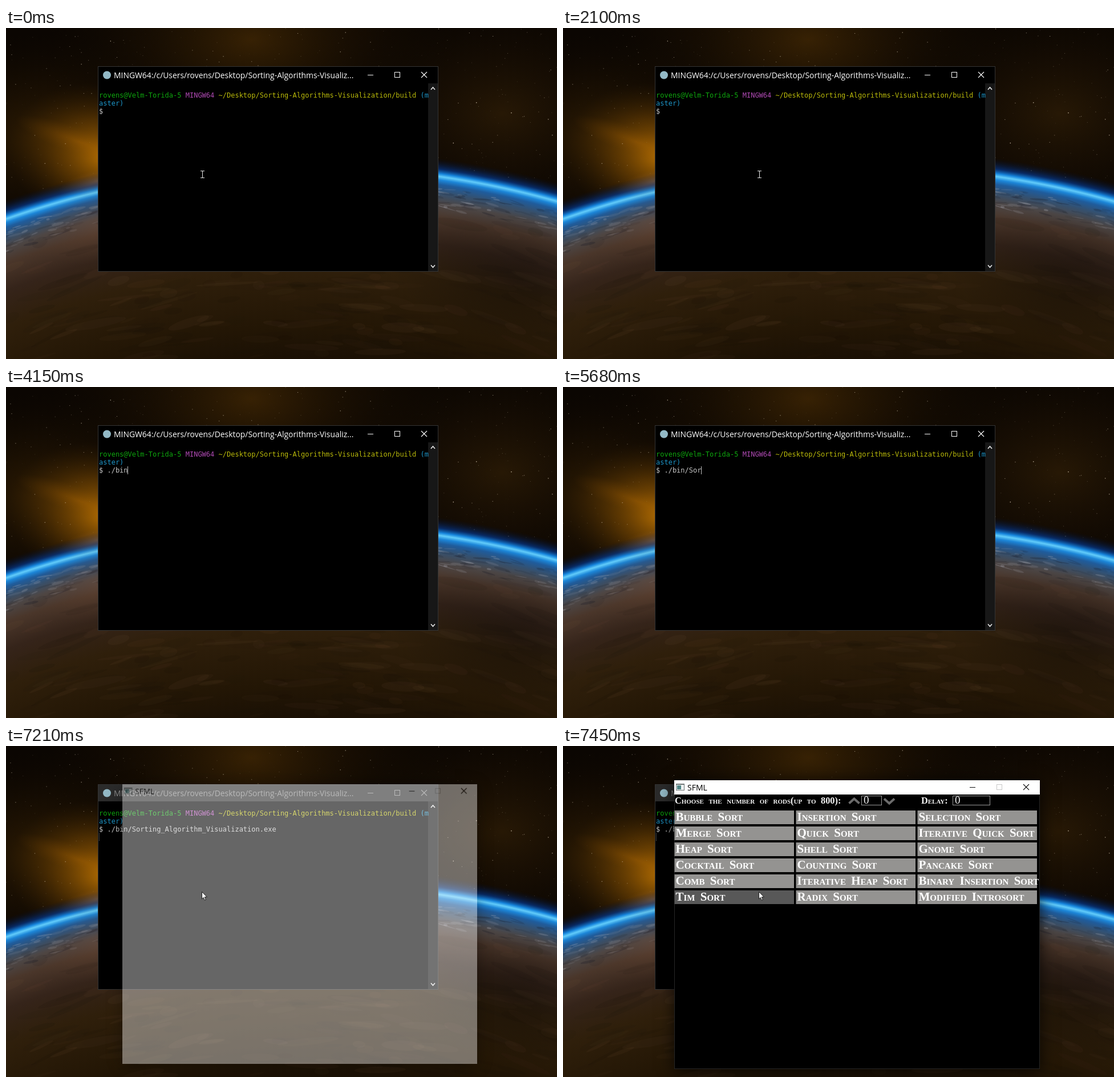
Write an HTML page with a canvas that moves like this. It is 966 by 580 pixels and loops after 8000 ms.

```html
<!DOCTYPE html>
<html lang="en">
<head>
<meta charset="utf-8">
<title>Terminal launching a sorting visualizer</title>
<style>
html, body { margin: 0; width: 100%; height: 100%; overflow: hidden; background: #000; }
canvas { display: block; }
</style>
</head>
<body>
<canvas id="stage" width="966" height="580"></canvas>
<script>
const W = 966, H = 580, LOOP = 8000;
const UI = '"Open Sans", sans-serif';
const MONO = '12px "DejaVu Sans Mono", monospace';
const SERIF = '"Liberation Serif", serif';
const ctx = document.getElementById('stage').getContext('2d');

function layer(w, h) {
  const c = document.createElement('canvas');
  c.width = w;
  c.height = h;
  return c.getContext('2d');
}

function rect(g, color, x, y, w, h) {
  g.fillStyle = color;
  g.fillRect(x, y, w, h);
}

function text(g, str, x, y, color, font, gap = 0) {
  g.font = font;
  g.wordSpacing = gap + 'px';
  g.fillStyle = color;
  g.fillText(str, x, y);
}

function line(g, color, width, ...pts) {
  g.strokeStyle = color;
  g.lineWidth = width;
  g.beginPath();
  for (let i = 0; i < pts.length; i += 2) g.lineTo(pts[i], pts[i + 1]);
  g.stroke();
}

// Negative h points the chevron down.
function chevron(g, color, width, x, y, w, h) {
  line(g, color, width, x - w, y + h, x, y - h, x + w, y + h);
}

function controls(g, color, boxColor, xs, y) {
  const [min, max, close] = xs;
  rect(g, color, min - 5, y, 10, 1);
  g.strokeStyle = boxColor;
  g.lineWidth = 1;
  g.strokeRect(max - 4.5, y - 4.5, 9, 9);
  line(g, color, 1.1, close - 5, y - 5, close + 5, y + 5);
  line(g, color, 1.1, close - 5, y + 5, close + 5, y - 5);
}

// ---- desktop picture ----
function desktop() {
  const g = layer(W, H);
  let seed = 11;
  const rnd = () => (seed = seed * 16807 % 2147483647) / 2147483647;

  function glow(x, y, r, squash, tilt, ...stops) {
    g.save();
    g.translate(x, y);
    g.rotate(tilt);
    g.scale(1, squash);
    const grad = g.createRadialGradient(0, 0, 0, 0, 0, r);
    stops.forEach((c, i) => grad.addColorStop(i / (stops.length - 1), c));
    rect(g, grad, -r, -r, 2 * r, 2 * r);
    g.restore();
  }

  rect(g, '#0b0602', 0, 0, W, H);
  glow(430, 20, 360, .6, 0, 'rgba(66,40,4,.8)', 'rgba(40,24,3,.4)', 'rgba(20,12,2,0)');
  glow(870, 150, 280, .7, 0, 'rgba(46,29,6,.8)', 'rgba(30,18,4,.5)', 'rgba(20,12,2,0)');
  glow(60, 190, 260, .7, 0, 'rgba(62,38,4,.7)', 'rgba(40,24,3,.4)', 'rgba(20,12,2,0)');
  glow(172, 225, 170, .75, .2, 'rgba(200,122,2,.9)', 'rgba(130,78,2,.5)', 'rgba(60,36,2,0)');
  glow(130, 200, 120, .2, .35, 'rgba(170,100,2,.35)', 'rgba(120,70,2,0)');

  for (let i = 0; i < 520; i++) {
    const x = rnd() * W, y = rnd() * 300, s = .5 + rnd() * .9;
    rect(g, `rgba(230,215,190,${.12 + .75 * rnd() ** 3})`, x, y, s, s);
  }

  // planet: one big disc shaded by distance from its centre
  const cx = 532, cy = 1852, inner = 1250, outer = 1640;
  const shade = g.createRadialGradient(cx, cy, inner, cx, cy, outer);
  [[1250, '#170e04'], [1330, '#231605'], [1430, '#2f1f0b'], [1490, '#35241a'],
   [1535, '#4a362a'], [1562, '#4c4747'], [1580, '#35506e'], [1594, '#1f5c9c'],
   [1602, '#1c86d8'], [1608, '#62ccfa'], [1613, '#1584dc'], [1621, 'rgba(5,52,130,.75)'],
   [1640, 'rgba(2,12,40,0)']]
    .forEach(([r, c]) => shade.addColorStop((r - inner) / (outer - inner), c));
  g.fillStyle = shade;
  g.beginPath();
  g.arc(cx, cy, outer, 0, 7);
  g.fill();

  function cloud(r, a, len, thick, color) {
    g.fillStyle = color;
    g.beginPath();
    g.ellipse(cx + r * Math.sin(a), cy - r * Math.cos(a), len, thick, a + rnd() * .3 - .15, 0, 7);
    g.fill();
  }
  const angle = () => (rnd() - .5) * .76;
  for (let i = 0; i < 420; i++) {
    const color = rnd() < .5 ? '190,190,200' : '22,24,34';
    cloud(1552 + rnd() * 38, angle(), 3 + rnd() * 14, .5 + rnd() * 2, `rgba(${color},${.06 + rnd() * .2})`);
  }
  for (let i = 0; i < 300; i++) {
    const color = rnd() < .5 ? '130,95,65' : '12,7,3';
    cloud(1270 + rnd() * 285, angle(), 10 + rnd() * 45, 2 + rnd() * 7, `rgba(${color},${.02 + rnd() * .06})`);
  }
  glow(170, 345, 130, .5, -.2, 'rgba(120,80,58,.4)', 'rgba(90,60,40,0)');
  glow(160, 268, 70, .3, -.28, 'rgba(170,120,80,.4)', 'rgba(120,80,40,0)');
  glow(900, 440, 230, .5, .2, 'rgba(8,5,3,.45)', 'rgba(8,5,3,0)');
  return g.canvas;
}

// ---- terminal ----
const COL = 7.2246, LEFT = 163;
const COMMAND = './bin/Sorting_Algorithm_Visualization.exe ';
const PROMPT = [
  ['rovens@Velm-Torida-5', 0, '#0ea80e'],
  ['MINGW64', 21, '#b04ab4'],
  ['~/Desktop/Sorting-Algorithms-Visualization/build', 29, '#b9b90a'],
  ['(m', 78, '#1c95c8']
];
const row = i => 122.4 + 13.6 * i;
const mono = (str, col, i, color) => text(ctx, str, LEFT + col * COL, row(i), color, MONO);

// time, characters typed, caret shown
const TYPING = [
  [0, 0, 0], [450, 0, 1], [1000, 0, 0], [1550, 0, 1], [2100, 0, 0], [2620, 0, 1],
  [2740, 1, 1], [3080, 2, 1], [3610, 2, 0], [3720, 3, 1], [3940, 4, 1], [4150, 5, 1],
  [4700, 6, 1], [5130, 6, 0], [5470, 7, 1], [5680, 9, 1], [5900, 10, 1],
  [6130, 42, 1], [6690, 42, 0]
];
const ENTER = 6990, LAUNCH = 7210;

function terminal(t) {
  const active = t < LAUNCH;
  const ink = active ? '#fff' : '#8c8c8c';
  rect(ctx, '#343434', 161, 67, 597, 360);
  rect(ctx, '#000', 162, 68, 595, 358);
  if (!active) rect(ctx, '#2b2b2b', 162, 68, 595, 29);
  ctx.fillStyle = '#93b9c6';
  ctx.beginPath();
  ctx.arc(177, 82.5, 7, 0, 7);
  ctx.fill();
  text(ctx, 'MINGW64:/c/Users/rovens/Desktop/Sorting-Algorithms-Visualiz...', 189, 88, ink, '13.9px ' + UI);
  controls(ctx, ink, ink, [639, 686, 733], 82);
  rect(ctx, '#171717', 740, 97, 17, 329);
  chevron(ctx, '#e8e8e8', 1.6, 748.5, 106, 3.5, 2);
  chevron(ctx, '#e8e8e8', 1.6, 748.5, 417.5, 3.5, -2);

  for (const [str, col, color] of PROMPT) mono(str, col, 0, color);
  mono('aster)', 0, 1, PROMPT[3][2]);
  const [, typed, caret] = TYPING.findLast(s => s[0] <= t);
  mono('$ ' + COMMAND.slice(0, typed), 0, 2, '#c6c6c6');

  if (!active) for (let y = 153; y < 167; y += 2) rect(ctx, '#777', LEFT, y, 1, 1);
  else if (t >= ENTER) rect(ctx, '#bfbfbf', LEFT, 153, 1, 14);
  else if (caret) rect(ctx, '#bfbfbf', Math.floor(LEFT + (2 + typed) * COL), 139, 1, 14);
}

// ---- sorting app ----
const SORTS = [
  'Bubble Sort', 'Insertion Sort', 'Selection Sort',
  'Merge Sort', 'Quick Sort', 'Iterative Quick Sort',
  'Heap Sort', 'Shell Sort', 'Gnome Sort',
  'Cocktail Sort', 'Counting Sort', 'Pancake Sort',
  'Comb Sort', 'Iterative Heap Sort', 'Binary Insertion Sort',
  'Tim Sort', 'Radix Sort', 'Modified Introsort'
];

function appWindow(loaded) {
  const g = layer(641, 506);
  rect(g, '#fff', 0, 0, 641, 506);
  rect(g, '#6f7676', 3, 6, 15, 12);
  rect(g, '#eef2f2', 4, 8, 13, 9);
  rect(g, '#4f8585', 5, 9, 7, 7);
  text(g, 'SFML', 23, 17.5, '#000', '14px ' + UI);
  controls(g, '#111', '#c8c8c8', [523, 570, 617], 12);
  if (!loaded) return g.canvas;

  rect(g, '#262626', 0, 25, 641, 481);
  rect(g, '#000', 1, 25, 639, 480);
  const small = 'small-caps bold 16.3px ' + SERIF;
  text(g, 'Choose the number of rods(up to 800):', 1, 41, '#f4f4f4', small, 4.5);
  text(g, 'Delay:', 433, 41, '#f4f4f4', small);
  chevron(g, '#6c6c6c', 4, 315.5, 36.5, 9, 4);
  chevron(g, '#6c6c6c', 4, 377, 36.5, 9, -4);
  for (const [x, w] of [[328.5, 35], [488.5, 65]]) {
    g.strokeStyle = '#9a9a9a';
    g.lineWidth = 1;
    g.strokeRect(x, 27.5, w, 16);
    text(g, '0', x + 3.5, 41, '#f4f4f4', '19px ' + SERIF);
  }
  SORTS.forEach((name, i) => {
    const x = .5 + i % 3 * 213, y = 53 + Math.floor(i / 3) * 28;
    rect(g, name === 'Tim Sort' ? '#585858' : '#949391', x, y, 209.5, 24);
    text(g, name, x + 2, y + 17.5, '#fff', 'small-caps bold 21px ' + SERIF, 4);
  });
  return g.canvas;
}

function showApp(img, alpha, x, y, w, h) {
  ctx.save();
  ctx.globalAlpha = alpha;
  // shadow only outside the window
  ctx.save();
  ctx.beginPath();
  ctx.rect(0, 0, W, H);
  ctx.rect(x, y, w, h);
  ctx.clip('evenodd');
  ctx.shadowColor = 'rgba(0,0,0,.75)';
  ctx.shadowBlur = 26;
  ctx.shadowOffsetY = 3;
  rect(ctx, '#000', x, y, w, h);
  ctx.restore();
  ctx.drawImage(img, x, y, w, h);
  ctx.restore();
}

// ---- mouse ----
function beam() {
  rect(ctx, '#e6e6e6', 344, 250, 1, 13);
  rect(ctx, '#e6e6e6', 341, 250, 7, 1);
  rect(ctx, '#e6e6e6', 341, 262, 7, 1);
}

function arrow() {
  const p = new Path2D('M343.5 255.5V268l2.8-2.6 2 4.8 2-.9-2-4.6h4z');
  ctx.fillStyle = '#fff';
  ctx.fill(p);
  ctx.strokeStyle = '#111';
  ctx.lineWidth = .9;
  ctx.stroke(p);
}

const sky = desktop(), blank = appWindow(false), app = appWindow(true);

function draw() {
  const t = performance.now() % LOOP;
  ctx.drawImage(sky, 0, 0);
  terminal(t);
  if (t >= 7450) showApp(app, 1, 195, 60, 641, 506);
  else if (t >= 7330) showApp(app, .87, 198, 62, 635, 501);
  else if (t >= LAUNCH) showApp(blank, .4, 204, 67, 622, 490);
  if (t < 2740) beam();
  else if (t >= LAUNCH) arrow();
  requestAnimationFrame(draw);
}
draw();
</script>
</body>
</html>
```
